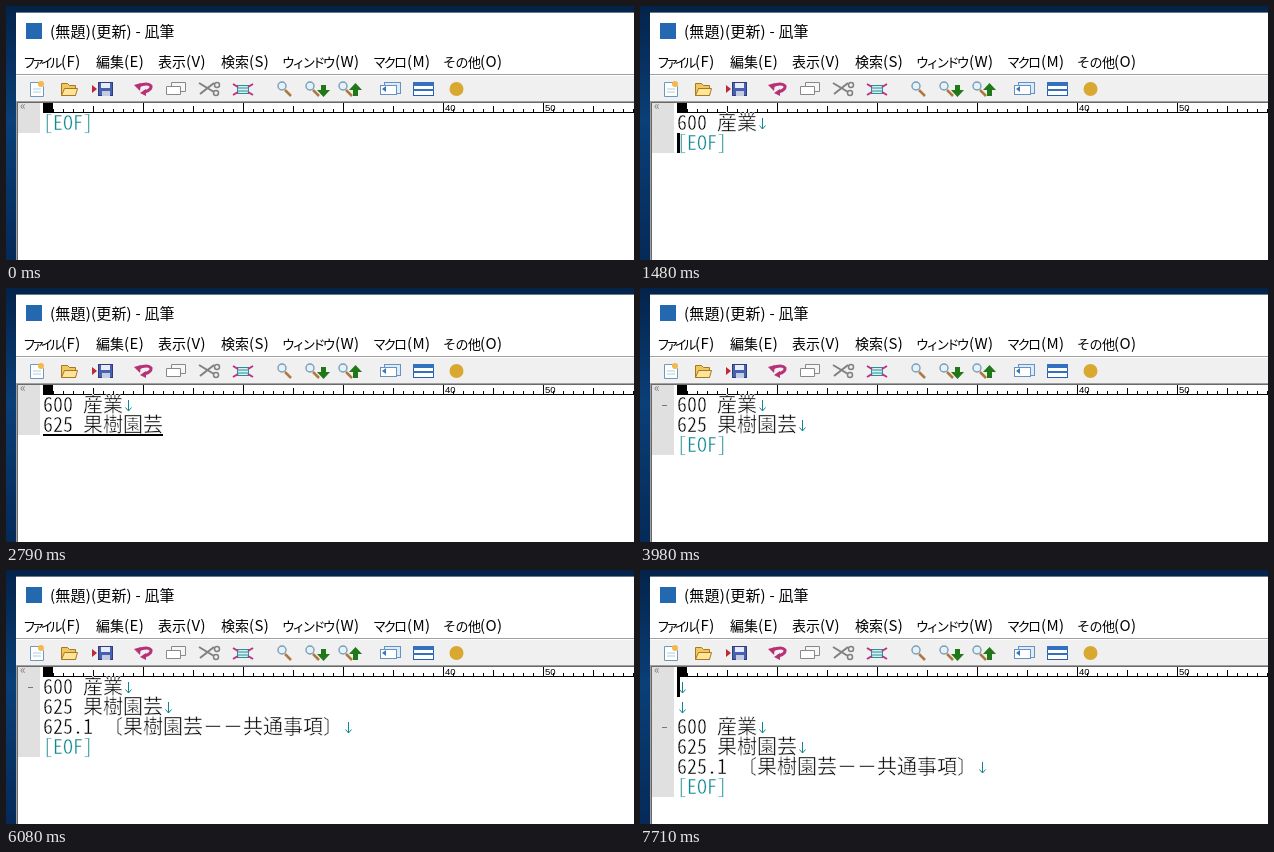
An HTML page with a canvas for the animation above (8 s loop, 628 by 254 pixels).

```html
<!DOCTYPE html>
<html lang="ja">
<head>
<meta charset="utf-8">
<style>
html, body { margin: 0; width: 628px; height: 254px; overflow: hidden; background: #fff; }
canvas { display: block; }
</style>
</head>
<body>
<canvas width="628" height="254"></canvas>
<script>
const ctx = document.querySelector('canvas').getContext('2d');
const LOOP = 8000, LEFT = 37, TOP = 107, CELL = 10, ROW = 20;
const TEAL = '#108890';
const UI = '"Noto Sans CJK JP", "Noto Sans CJK", "Noto Sans", sans-serif';
const MONO = '"Noto Sans Mono CJK JP", "Noto Sans CJK JP", "Noto Sans CJK", monospace';

const A = '600 産業', B = '625 果樹園芸', C = '625.1 〔果樹園芸－－共通事項〕';
const AB = [A, B], ABC = [A, B, C];

// Each step: start time, finished lines, then what else is on screen.
const steps = [
  [0, [], {}],
  [70, [], { comp: '６', popup: [361, 254] }],
  [223, [], { comp: '６０', popup: [361, 254] }],
  [377, [], { comp: '６００', popup: [361, 254] }],
  [530, [], { comp: '６００', popup: [345, 236] }],
  [850, [], { comp: A, done: true }],
  [1060, [], { tail: A, mark: 8 }],
  [1270, [], { tail: A, mark: 8, caret: 0 }],
  [1480, [A], { caret: 1 }],
  [2010, [A], { comp: '６', popup: [345, 260] }],
  [2166, [A], { comp: '６２', popup: [345, 260] }],
  [2322, [A], { comp: '６２５', popup: [345, 260] }],
  [2478, [A], { comp: '６２５', popup: [345, 256] }],
  [2634, [A], { comp: '６２５', done: true }],
  [2790, [A], { comp: B, done: true }],
  [3110, [A], { tail: B, mark: 12 }],
  [3270, [A], { tail: B, mark: 12, caret: 1 }],
  [3430, AB, { caret: 2 }],
  [3980, AB, {}],
  [4280, AB, { comp: '６', popup: [345, 260] }],
  [4420, AB, { comp: '６２', popup: [345, 260] }],
  [4560, AB, { comp: '６２５', popup: [345, 260] }],
  [4700, AB, { comp: '６２５．', popup: [345, 260] }],
  [4840, AB, { comp: '６２５．１', popup: [345, 260] }],
  [4980, AB, { comp: C, done: true }],
  [5300, AB, { tail: C, mark: 30 }],
  [5415, AB, { tail: C, mark: 30, caret: 2 }],
  [5530, ABC, { caret: 3 }],
  [6080, ABC, {}],
  [6540, ABC, { caret: 2 }],
  [6700, ABC, { caret: 1 }],
  [6860, ABC, { caret: 0 }],
  [7010, ['', ...ABC], { caret: 1 }],
  [7190, ['', '', ...ABC], { caret: 2 }],
  [7370, ['', '', ...ABC], { caret: 1 }],
  [7540, ['', '', ...ABC], {}],
  [7710, ['', '', ...ABC], { caret: 0 }]
];

function rect(x, y, w, h, color) {
  ctx.fillStyle = color;
  ctx.fillRect(x, y, w, h);
}
function box(x, y, w, h, fill, edge) {
  rect(x, y, w, h, edge);
  rect(x + 1, y + 1, w - 2, h - 2, fill);
}
function label(text, x, y, size, gap = 0, color = '#000') {
  ctx.font = `${size}px ${UI}`;
  ctx.letterSpacing = gap + 'px';
  ctx.fillStyle = color;
  ctx.fillText(text, x, y);
  ctx.letterSpacing = '0px';
}
function path(d, color, width = 1, fill) {
  const p = new Path2D(d);
  if (fill) { ctx.fillStyle = fill; ctx.fill(p); }
  if (color) { ctx.strokeStyle = color; ctx.lineWidth = width; ctx.stroke(p); }
}
function disc(x, y, r, color, edge, width = 1) {
  ctx.beginPath();
  ctx.arc(x, y, r, 0, 7);
  ctx.fillStyle = color;
  ctx.fill();
  if (edge) { ctx.strokeStyle = edge; ctx.lineWidth = width; ctx.stroke(); }
}

const cells = ch => /[ -~]/.test(ch) ? CELL : 2 * CELL;
const widthOf = text => [...text].reduce((sum, ch) => sum + cells(ch), 0);

// Draws text on the character grid and returns its right end.
// The white outline thins the strokes.
function grid(text, x, y, color = '#000') {
  ctx.font = `20px ${MONO}`;
  ctx.textAlign = 'center';
  ctx.fillStyle = color;
  ctx.strokeStyle = '#fff';
  ctx.lineWidth = 0.5;
  for (const ch of text) {
    ctx.fillText(ch, x + cells(ch) / 2, y + 17);
    ctx.strokeText(ch, x + cells(ch) / 2, y + 17);
    x += cells(ch);
  }
  ctx.textAlign = 'left';
  return x;
}

function magnifier(x) {
  path(`M${x + 8} 84l6 6`, '#b07840', 2.5);
  disc(x + 5, 80, 4, '#e4f2fa', '#7c9cb8', 1.4);
}

function toolbar() {
  rect(10, 68, 618, 27, '#f0f0f0');
  rect(10, 68, 618, 1, '#a0a0a0');
  rect(10, 69, 618, 1, '#fff');
  path('M24.5 76.5h9l4 4v10h-13z', '#6d9ab8', 1, '#fff');
  path('M27 83h8M27 86h8', '#a8cfe4');
  disc(35, 78, 3, '#f4b84c');
  path('M55.5 89.5v-12h6l2 2h6v10z', '#a87820', 1, '#f0c860');
  path('M55.5 89.5l3-7h13l-2 7z', '#a87820', 1, '#ffe49a');
  path('M86 79l5 4-5 4z', null, 0, '#c02838');
  box(92, 76, 15, 14, '#4860b0', '#303c80');
  rect(95, 77, 9, 5, '#e8ecf8');
  rect(96, 85, 8, 5, '#c4cce4');
  path('M132 80q10-4 13 0q1 4-7 6', '#b83078', 3);
  path('M128 79l6 6 1-8z', null, 0, '#b83078');
  path('M140 83v7l-6-3z', null, 0, '#b83078');
  path('M165.500 76.500h14v9h-14z', '#888', 1, '#f6f6f6');
  path('M160.500 80.500h14v8h-14z', '#888', 1, '#fff');
  path('M193 77l15 9M194 88l14-11', '#808080', 2);
  disc(211, 79, 2.5, '#f0f0f0', '#808080', 1.5);
  disc(210, 87, 2.5, '#f0f0f0', '#808080', 1.5);
  box(231, 79, 12, 9, '#d8f0f0', '#289098');
  path('M231 82h12M231 85h12', '#289098');
  path('M227 78l5 3M247 78l-5 3M227 89l5-3M247 89l-5-3', '#c03080', 2);
  [271, 299, 332].forEach(magnifier);
  path('M315 79h5v5h4l-6.500 7-6.500-7h4z', null, 0, '#207818');
  path('M347 90h5v-6h4l-6.500-7-6.500 7h4z', null, 0, '#207818');
  box(378, 76, 17, 12, '#dcecfa', '#6890c0');
  box(374, 79, 17, 10, '#fff', '#6890c0');
  path('M376 83l4-3v6z', null, 0, '#3878b8');
  box(407, 76, 21, 14, '#fff', '#2860b0');
  rect(407, 76, 21, 4, '#3470c0');
  rect(407, 83, 21, 2, '#3470c0');
  disc(450.5, 83, 7, '#d8a830');
}

function ruler(mark) {
  rect(34, 97, 594, 10, '#fff');
  rect(LEFT, 106, 591, 1, '#000');
  for (let i = 0; LEFT + i * CELL < 628; i++) {
    const h = i % 10 ? i % 5 ? 4 : 7 : 10;
    rect(LEFT + i * CELL, 107 - h, 1, h, '#000');
  }
  ctx.font = '9.5px "Liberation Sans", sans-serif';
  ctx.fillText('40', 439, 105);
  ctx.fillText('50', 539, 105);
  rect(LEFT + mark * CELL, 97, CELL, 10, '#000');
}

function chrome() {
  const sky = ctx.createLinearGradient(0, 0, 0, 254);
  sky.addColorStop(0, '#04234a');
  sky.addColorStop(0.45, '#0a3f78');
  sky.addColorStop(1, '#052a58');
  rect(0, 0, 628, 254, sky);
  rect(10, 7, 618, 247, '#fff');
  rect(10, 6, 618, 1, '#6c7a88');
  rect(20, 17, 16, 16, '#2468b0');
  label('(無題)(更新) - 凪筆', 44, 31, 15, 0.2);
  const menu = [
    ['ファイル', 17, -4.2, '(F)', 55], ['編集', 90, 0, '(E)', 118],
    ['表示', 152, 0, '(V)', 180], ['検索', 215, 0, '(S)', 243],
    ['ウィンドウ', 276, -2.8, '(W)', 329], ['マクロ', 367, -2.5, '(M)', 401],
    ['その他', 437, -0.5, '(O)', 474]
  ];
  for (const [name, x, gap, key, kx] of menu) {
    label(name, x, 61, name.length > 2 ? 13 : 14, gap);
    label(key, kx, 61, 15, 0.4);
  }
  toolbar();
  // Sunken edge of the editing area.
  rect(10, 95, 618, 159, '#a0a0a0');
  rect(11, 96, 617, 158, '#696969');
  rect(12, 97, 616, 157, '#fff');
}

function suggestions(y, [w, bottom]) {
  box(16, y, w, bottom - y, '#fff', '#a0a0a0');
  ctx.save();
  ctx.beginPath();
  ctx.rect(17, y + 1, w - 2, bottom - y - 2);
  ctx.clip();
  [A, B, C, '６００', '６２５'].forEach((text, i) => label(text, 37, y + 18 + i * 21, 15));
  ctx.restore();
}

function draw(now) {
  const time = now % LOOP;
  const [, lines, { comp, done, popup, tail = '', caret, mark = 0 }] = steps.findLast(s => s[0] <= time);
  const lineY = i => TOP + i * ROW;
  const last = lineY(lines.length);
  const head = lines.indexOf(A);
  const active = lines.includes(C) && caret === head;

  chrome();
  ruler(mark);
  rect(12, 97, 22, last + ROW - 97, '#e0e0e0');
  label('«', 14, 104, 12, 0, '#86787e');

  lines.forEach((text, i) => {
    const y = lineY(i);
    const x = grid(text, LEFT, y, active && i === head ? '#800000' : '#000');
    path(`M${x + 5.5} ${y + 5}v11m-3-3.5l3 3.5 3-3.5`, TEAL);
  });
  const end = grid(tail, LEFT, last);
  grid('[EOF]', end, last, TEAL);

  if (lines.includes(B)) rect(22, lineY(head) + 10, 5, 1, '#777');
  if (active) {
    for (let y = lineY(head) + 14; y < last; y += 2) rect(24, y, 1, 1, '#777');
    rect(24, last - 1, 4, 1, '#999');
  }
  if (comp) {
    const w = widthOf(comp);
    rect(LEFT, last, Math.max(w, 5 * CELL), ROW, '#fff');
    grid(comp, LEFT, last);
    if (done) rect(LEFT, last + 19, w, 2, '#000');
    else for (let x = 0; x < w; x += 4) rect(LEFT + x, last + 19, 2, 1, '#000');
  }
  if (popup) suggestions(last + 24, popup);
  if (caret !== undefined) rect(LEFT + mark * CELL, lineY(caret), 3, ROW, '#000');
}

function frame() {
  draw(performance.now());
  requestAnimationFrame(frame);
}
frame();
</script>
</body>
</html>
```
